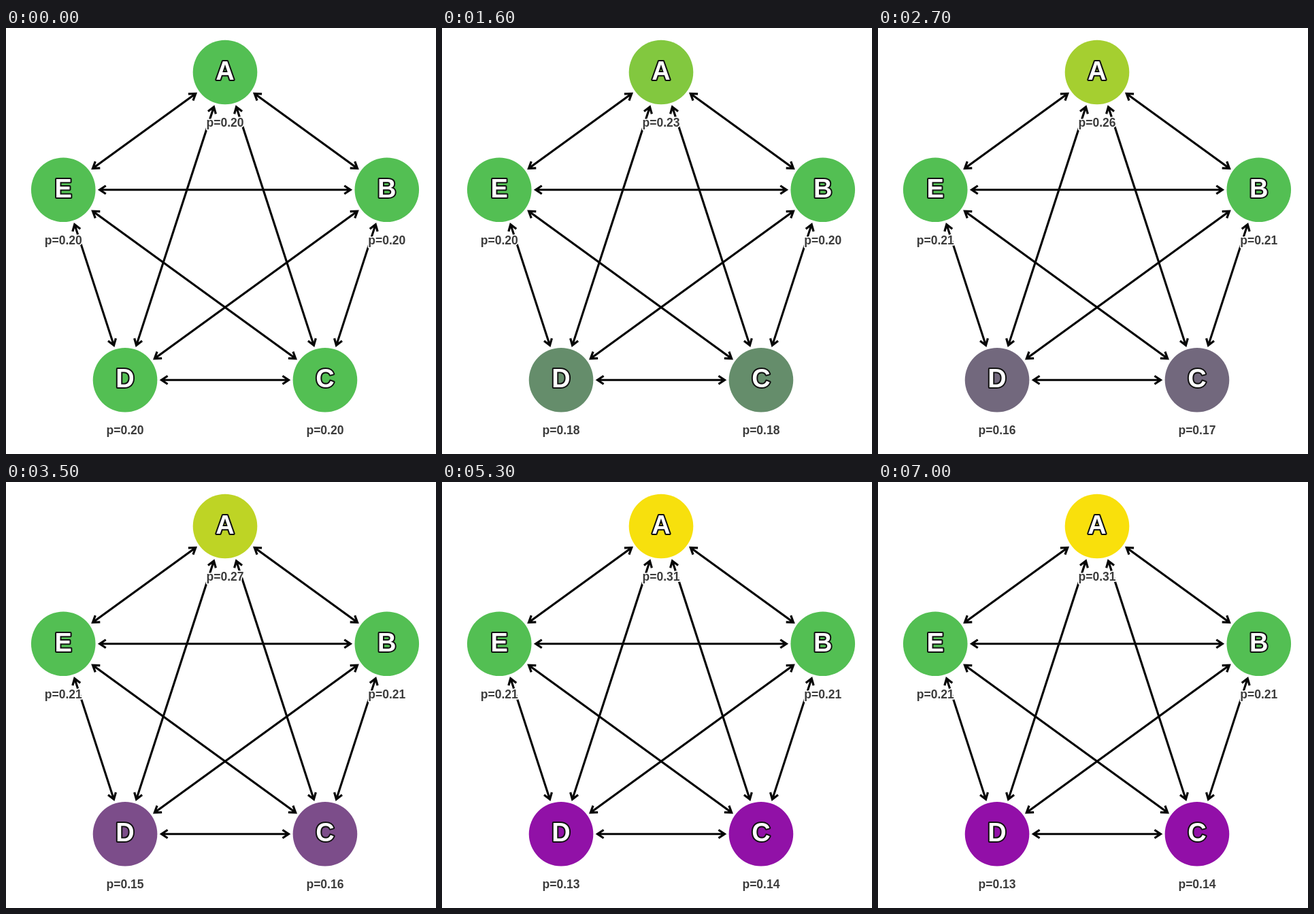
An HTML page with a canvas for the animation above (7100 ms loop, 632 by 626 pixels).

```html
<!DOCTYPE html>
<html lang="en">
<head>
<meta charset="utf-8">
<style>
html, body { margin: 0; width: 100%; height: 100%; overflow: hidden; background: #fff; }
canvas { display: block; }
</style>
</head>
<body>
<canvas id="stage" width="632" height="626"></canvas>
<script>
const ctx = document.getElementById('stage').getContext('2d');
const LOOP = 7100, STEP = 100, DELAY = 120, RAMP = 5230;
const CENTER = { x: 322, y: 315 }, RING = 250, RADIUS = 47.3;
const FONT = '"Liberation Sans", Arial, sans-serif';
const GREEN = [83, 191, 83], YELLOW = [249, 224, 12], PURPLE = [146, 15, 168];
const START_P = 0.2;

const nodes = [
  { name: 'A', endP: 0.314, endColor: YELLOW },
  { name: 'B', endP: 0.2105, endColor: GREEN },
  { name: 'C', endP: 0.138, endColor: PURPLE },
  { name: 'D', endP: 0.127, endColor: PURPLE },
  { name: 'E', endP: 0.2105, endColor: GREEN }
].map((node, i) => {
  const angle = i * Math.PI * 2 / 5;
  return {
    ...node,
    x: CENTER.x + RING * Math.sin(angle),
    y: CENTER.y - RING * Math.cos(angle)
  };
});

const lerp = (a, b, u) => a + (b - a) * u;

function drawEdge(a, b) {
  const length = Math.hypot(b.x - a.x, b.y - a.y);
  const gap = 53.5, back = 9, half = 6;
  ctx.save();
  ctx.translate(a.x, a.y);
  ctx.rotate(Math.atan2(b.y - a.y, b.x - a.x));
  ctx.beginPath();
  ctx.moveTo(gap, 0);
  ctx.lineTo(length - gap, 0);
  for (const [tip, dir] of [[gap, 1], [length - gap, -1]]) {
    ctx.moveTo(tip + dir * back, -half);
    ctx.lineTo(tip, 0);
    ctx.lineTo(tip + dir * back, half);
  }
  ctx.strokeStyle = '#050505';
  ctx.lineWidth = 3.2;
  ctx.lineJoin = 'miter';
  ctx.stroke();
  ctx.restore();
}

function drawText(text, x, y, size, fill, outline, width) {
  ctx.font = `bold ${size}px ${FONT}`;
  ctx.textAlign = 'center';
  ctx.textBaseline = 'alphabetic';
  ctx.lineJoin = 'round';
  ctx.lineWidth = width;
  ctx.strokeStyle = outline;
  ctx.strokeText(text, x, y);
  ctx.fillStyle = fill;
  ctx.fillText(text, x, y);
}

function drawNode(node, u) {
  const color = GREEN.map((c, i) => Math.round(lerp(c, node.endColor[i], u)));
  ctx.fillStyle = `rgb(${color})`;
  ctx.beginPath();
  ctx.arc(node.x, node.y, RADIUS, 0, Math.PI * 2);
  ctx.fill();
  drawText(node.name, node.x, node.y + 11, 38, '#fff', '#111', 4);
  const p = lerp(START_P, node.endP, u).toFixed(2);
  drawText('p=' + p, node.x, node.y + 80, 17.5, '#3c3c3c', '#fff', 3.5);
}

function render(now) {
  const time = Math.floor((now % LOOP) / STEP) * STEP;
  const u = Math.min(1, Math.max(0, (time - DELAY) / RAMP));
  ctx.fillStyle = '#fff';
  ctx.fillRect(0, 0, 632, 626);
  nodes.forEach((a, i) => nodes.slice(i + 1).forEach(b => drawEdge(a, b)));
  nodes.forEach(node => drawNode(node, u));
}

const begin = performance.now();
function tick() {
  render(performance.now() - begin);
  requestAnimationFrame(tick);
}
tick();
</script>
</body>
</html>
```
